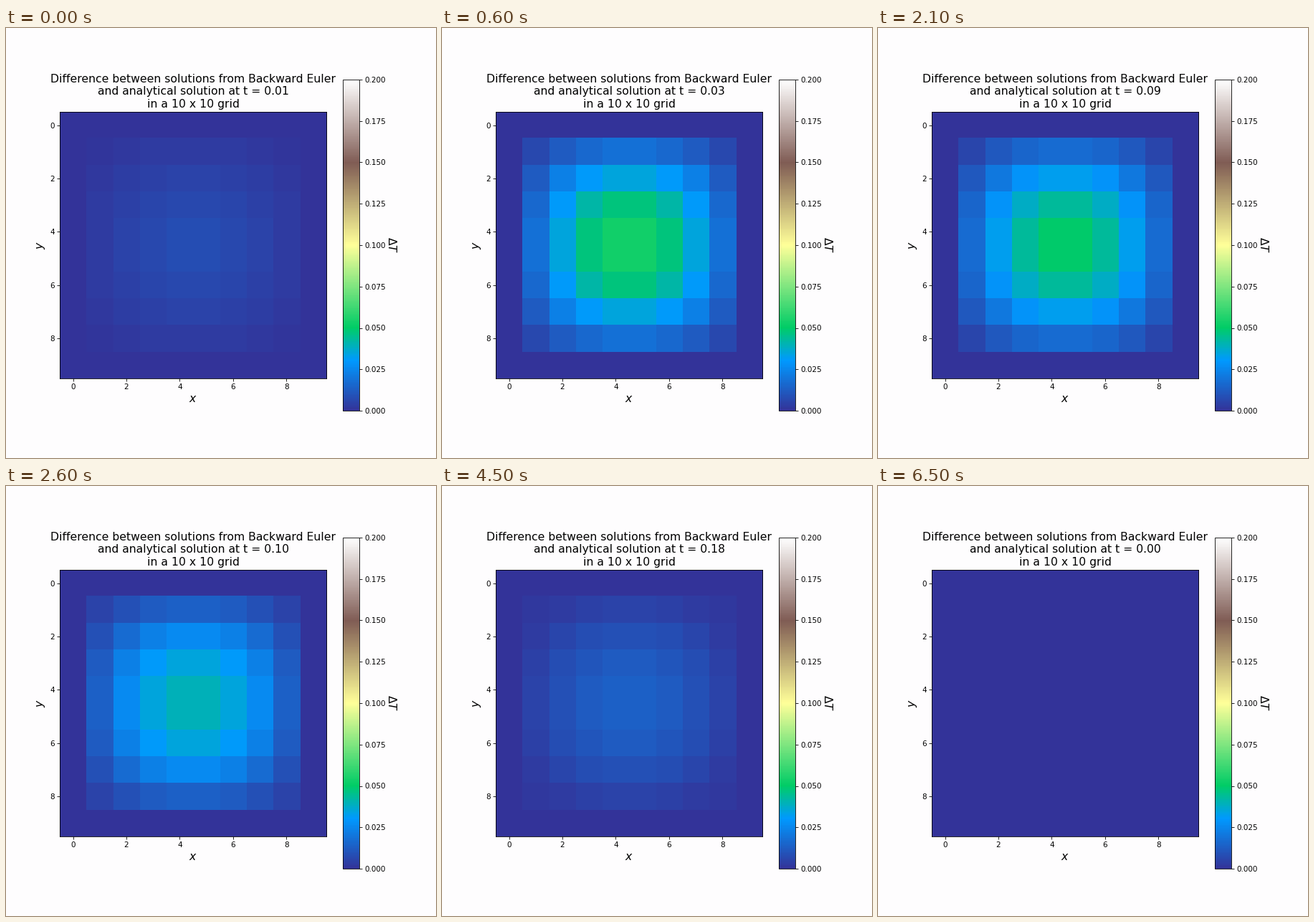
Animation of 600 by 600 pixels, one loop 6600 ms. Source, as a matplotlib script:

```python
import matplotlib.pyplot as plt
import numpy as np
from matplotlib.animation import FuncAnimation

INCHES, DPI = 8, 75
FRAMES, INTERVAL = 66, 100
GRID = 10
DT = 0.25 / 67
WHITE = "#fefdfe"

# Fundamental mode on the grid, scaled so the central cells equal 1
wave = np.sin(np.pi * np.arange(GRID) / (GRID - 1))
MODE = np.outer(wave, wave)
MODE /= MODE.max()


def is_start(frame):
    """The loop closes on the initial state."""
    return frame == FRAMES - 1


def time_at(frame):
    return 0.0 if is_start(frame) else (frame + 2) * DT


def error_at(frame):
    """Error grows linearly, then decays with the solution."""
    if is_start(frame):
        return 0 * MODE
    step = frame + 0.58
    return 0.0142 * step * np.exp(-0.0846 * step) * MODE


def title_at(frame):
    return ("Difference between solutions from Backward Euler\n"
            f"and analytical solution at t = {time_at(frame):.2f}\n"
            f"in a {GRID} x {GRID} grid")


fig, ax = plt.subplots(figsize=(INCHES, INCHES), dpi=DPI, facecolor=WHITE)
image = ax.imshow(error_at(0), cmap="terrain", vmin=0, vmax=0.2,
                  interpolation="nearest")
title = ax.set_title(title_at(0), fontsize=15)
ax.set_xlabel("$x$", fontsize=15)
ax.set_ylabel("$y$", fontsize=15)
bar = fig.colorbar(image, ax=ax)
bar.set_label(r"$\Delta T$", fontsize=15, rotation=270, labelpad=15)


def update(frame):
    image.set_data(error_at(frame))
    title.set_text(title_at(frame))
    return image, title


anim = FuncAnimation(fig, update, frames=FRAMES, interval=INTERVAL,
                     repeat=True, repeat_delay=0)
plt.show()
```
